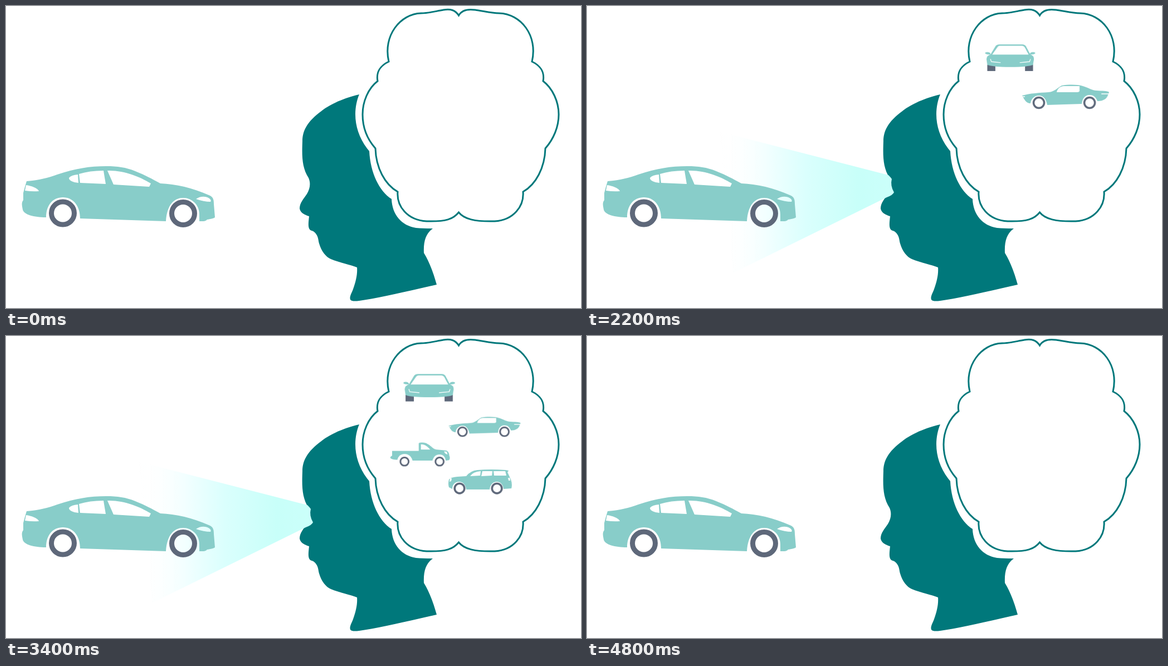
An HTML page without scripts for the animation above (5 s loop, 1032x543 px).

```html
<!DOCTYPE html>
<html lang="en">
<head>
<meta charset="utf-8">
<title>Recognising a car</title>
<style>
  html, body { margin: 0; width: 100%; height: 100%; overflow: hidden; background: #fff; }
  svg { display: block; width: 100%; height: 100%; }

  .body { fill: #88cdc9; fill-rule: evenodd; }
  .wheel { fill: none; stroke: #5e687a; }
  .tyre { fill: #5e687a; }
  .lamp { fill: none; stroke: #fff; stroke-width: 1.5; }
  .head { fill: #00787b; }
  .brain { fill: none; stroke: #00787b; stroke-width: 3; }

  .beam { animation: beam 5s linear infinite; }
  .thoughts { animation: fade 5s linear infinite; }
  .pop { animation: 5s cubic-bezier(.4, 0, .5, 1) infinite; }
  .front { transform-origin: 759.5px 93px; animation-name: pop1; }
  .coupe { transform-origin: 859px 163.5px; animation-name: pop2; }
  .truck { transform-origin: 743.5px 213px; animation-name: pop3; }
  .suv { transform-origin: 851px 262.5px; animation-name: pop4; }

  @keyframes beam {
    0%, 11.2% { opacity: 0; }
    20%, 89.6% { opacity: 1; }
    96%, 100% { opacity: 0; }
  }
  @keyframes fade {
    0%, 89.6% { opacity: 1; }
    96%, 100% { opacity: 0; }
  }
  /* the same damped bounce, 600 ms apart */
  @keyframes pop1 {
    0%, 21.6% { transform: scale(0); animation-timing-function: cubic-bezier(.35, 0, .45, 1); }
    32.4% { transform: scale(1.002); }
    43.6% { transform: scale(.797); }
    54.4% { transform: scale(.829); }
    60.4%, 100% { transform: scale(.822); }
  }
  @keyframes pop2 {
    0%, 33.6% { transform: scale(0); animation-timing-function: cubic-bezier(.35, 0, .45, 1); }
    44.4% { transform: scale(1.002); }
    55.6% { transform: scale(.797); }
    66.4% { transform: scale(.829); }
    72.4%, 100% { transform: scale(.822); }
  }
  @keyframes pop3 {
    0%, 45.6% { transform: scale(0); animation-timing-function: cubic-bezier(.35, 0, .45, 1); }
    56.4% { transform: scale(1.002); }
    67.6% { transform: scale(.797); }
    78.4% { transform: scale(.829); }
    84.4%, 100% { transform: scale(.822); }
  }
  @keyframes pop4 {
    0%, 57.6% { transform: scale(0); animation-timing-function: cubic-bezier(.35, 0, .45, 1); }
    68.4% { transform: scale(1.002); }
    79.6% { transform: scale(.797); }
    90.4% { transform: scale(.829); }
    96.4%, 100% { transform: scale(.822); }
  }
</style>
</head>
<body>
<svg viewBox="0 0 1032 543">
  <defs>
    <linearGradient id="light" gradientUnits="userSpaceOnUse" x1="238" y1="0" x2="548" y2="0">
      <stop offset="0" stop-color="#fff" stop-opacity="0"/>
      <stop offset=".27" stop-color="#f2ffff"/>
      <stop offset=".5" stop-color="#dafffd"/>
      <stop offset=".8" stop-color="#c8fff9"/>
      <stop offset="1" stop-color="#cbfffa"/>
    </linearGradient>
  </defs>

  <path class="head" d="M634 159C600 167 577 180 566 189C540 208 532 225 532 243
    C531 270 531 290 543 309C547 318 546 328 540 338C534 347 527 354 527 364
    C528 372 537 376 544 378C543 388 542 395 544 400C546 405 551 403 555 408
    C561 415 560 420 562 427C566 441 574 451 583 455C600 462 618 465 630 470
    C631 482 628 495 623 509C620 517 616 523 618 528C620 531 626 531 634 530
    C670 525 720 513 773 501C767 480 760 460 750 444C749 422 754 409 766 400
    C755 400 745 400 736 399C710 395 693 375 692 347C670 333 654 300 652 261
    C635 241 627 217 627 195C627 181 630 168 634 159Z"/>

  <path class="brain" d="M812.500 17C806 7 798 5 785 7C772 9 760 13 745 13
    C708 14 676 53 687 100C672 107 664 119 667 135C650 148 640 172 640 195
    C640 217 648 239 663 256C664 291 680 321 703 334C701 360 720 385 755 387
    C790 388 803 383 812.500 371C822 383 841 388 877 387
    C911 385 930 360 928 334C951 321 967 291 968 256C983 239 992 217 992 195
    C992 172 981 148 964 135C967 119 959 107 944 100C955 53 924 14 885 13
    C870 13 857 9 842 7C828 5 818 7 812.500 17Z"/>

  <path class="beam" fill="url(#light)" d="M238 226L541 304Q545 308 547 311Q544 323 551 335Q549 340 538 344L262 480Z"/>

  <g>
    <path class="body" d="M37 315C60 313 75 309 92 303C125 292 150 288 180 288
      C200 288 215 290 232 297C250 304 262 311 277 319C305 320 335 327 364 340
      C372 343 373 348 373 356L375 380C371 383 365 383 361 384C358 388 352 387 347 387
      V374C347 358 334 345 318 345C301 345 289 358 287 387L133 382
      C133 360 121 344 102 344C84 344 72 358 72 380C50 380 32 375 30 366
      C29 360 27 354 31 349V336L34 325Z
      M129 303L130 318C120 317 113 314 113 309Q117 304 129 303Z
      M131 302Q150 296 175 296L179 320L133 318Z
      M182 296C212 295 240 307 260 319L257 325L193 321Z
      M36 322C45 323 58 328 59 333Q47 334 34 332Z
      M341 347C348 342 358 341 365 346Q369 349 367 352Q355 352 341 347Z"/>
    <g class="wheel" stroke-width="9">
      <circle cx="102" cy="372.500" r="20.500"/>
      <circle cx="318" cy="373" r="20.500"/>
    </g>
  </g>

  <g class="thoughts">
    <g class="pop front">
      <path class="tyre" d="M708 108L726 112V123H708ZM811 108L793 112V123H811Z"/>
      <path class="body" d="M715 86L727 66Q730 63 735 63H787Q792 63 795 67L805 86
        Q813 88 813 96L811 109Q800 114 760 114Q720 114 708 109L706 96Q707 88 715 86Z
        M719 86H801L792 69Q789 66 786 66H737Q733 66 731 69Z"/>
      <path class="body" d="M704 81Q710 79 714 82L716 86Q705 86 703 83Z
        M815 81Q809 79 805 82L803 86Q814 86 816 83Z"/>
      <path class="lamp" d="M715 96L717 102L738 104M805 96L803 102L781 104"/>
    </g>

    <g class="pop coupe">
      <path class="body" d="M781 161C795 157 812 156 828 155C840 154 844 147 852 143
        C865 141 880 141 890 144C900 147 907 152 914 152C924 153 934 152 937 155
        L935 160C933 166 928 171 916 171C913 163 908 160 902 160
        C894 160 889 166 888 176L826 178C824 167 819 161 811 161
        C803 161 797 167 796 175C788 175 785 168 781 161Z
        M843 155C844 149 849 144 856 144H884V153Q883 155 880 155Z"/>
      <path class="lamp" d="M923 158H936M782 163H786"/>
      <g class="wheel" stroke-width="3.500">
        <circle cx="811" cy="174" r="9.500"/>
        <circle cx="902" cy="174" r="9.500"/>
      </g>
    </g>

    <g class="pop truck">
      <path class="body" d="M680 205H740V188Q741 186 747 186C757 186 762 190 768 195
        Q774 201 780 202L802 204Q808 206 809 216Q812 222 808 226L801 227
        C800 219 795 213 787 213C778 213 773 219 771 227H726
        C724 218 718 212 708 212C699 212 694 217 692 225Q682 225 677 222
        Q674 219 680 216Z
        M745 190C755 190 760 196 766 202H745Z
        M797 206L803 207L805 213Q799 212 797 206Z"/>
      <g class="wheel" stroke-width="3.600">
        <circle cx="708" cy="229" r="9.200"/>
        <circle cx="787" cy="229" r="9.200"/>
      </g>
    </g>

    <g class="pop suv">
      <path class="body" d="M795 258Q798 254 810 253L826 252Q834 242 846 241
        Q870 239 897 241L902 242L900 245L906 258Q909 266 907 274L893 275
        C892 267 887 262 881 262C874 262 869 267 868 276H826
        C825 267 820 262 813 262C806 262 801 267 801 275L795 272Q793 266 795 258Z
        M833 252Q838 244 852 243L851 251ZM855 243H873L872 251L853 252Z
        M875 243H896L898 251H876Z
        M797 256H800L799 261L796 262ZM901 255H904L905 260H902Z"/>
      <g class="wheel" stroke-width="3.600">
        <circle cx="814" cy="274" r="8.800"/>
        <circle cx="881" cy="274" r="8.800"/>
      </g>
    </g>
  </g>
</svg>
</body>
</html>
```
